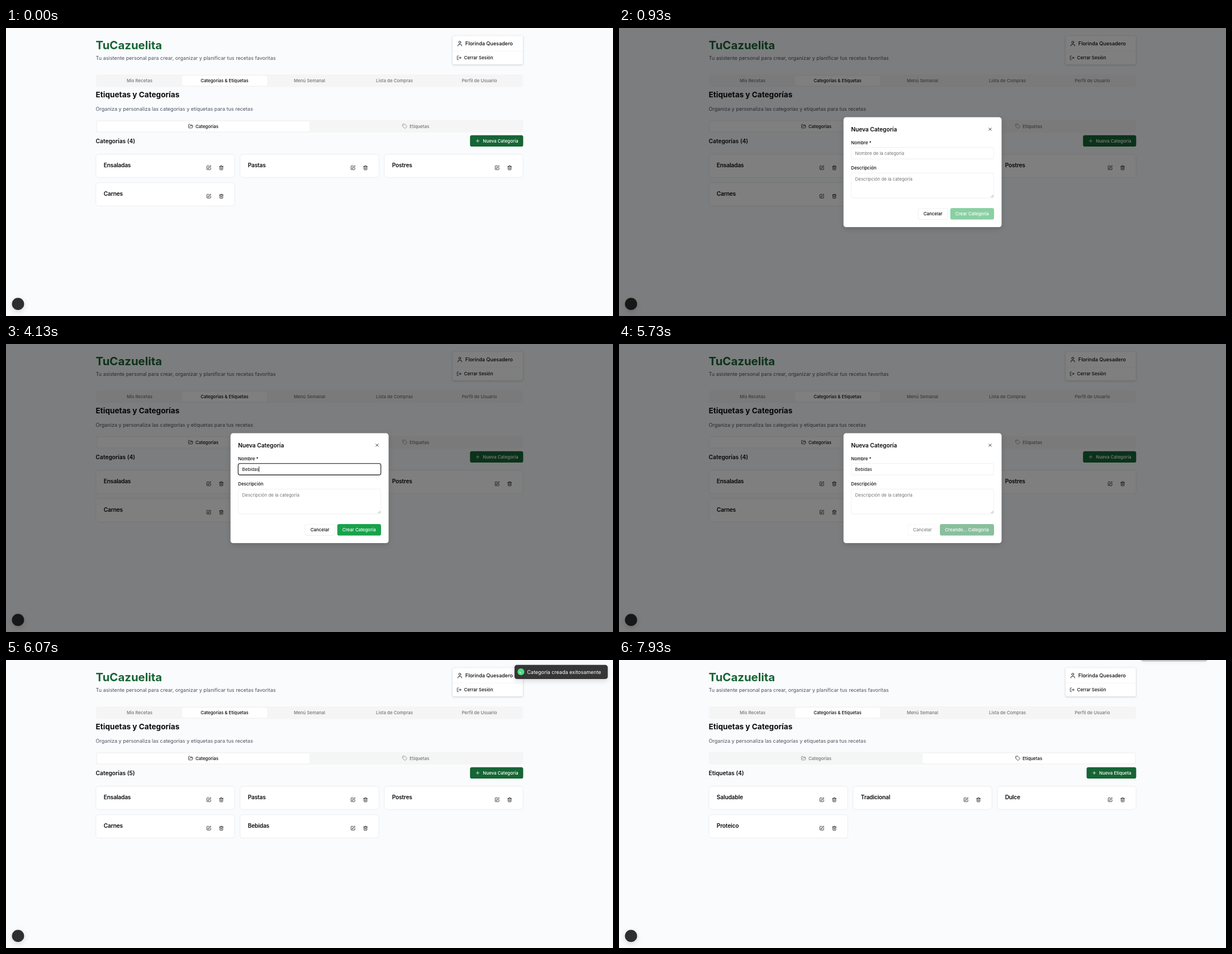
Animation of 1086 by 515 pixels, one loop 8000 ms. Source, as an HTML page:

```html
<!DOCTYPE html>
<html lang="es">
<head>
<meta charset="utf-8">
<title>Etiquetas y Categorías</title>
<style>
  html, body { margin: 0; width: 100%; height: 100%; overflow: hidden; background: #fafbfd; }
  svg { display: block; font-family: Inter, sans-serif; font-optical-sizing: none; }
  text { white-space: pre; }
  .sm { filter: drop-shadow(0 .6px .6px rgba(0, 0, 0, .08)); }
  .md { filter: drop-shadow(0 1.2px 1.5px rgba(0, 0, 0, .16)); }
  .lg { filter: drop-shadow(0 3px 5px rgba(0, 0, 0, .15)); }
</style>
</head>
<body>
<svg id="stage" width="1086" height="515" viewBox="0 0 1086 515"></svg>
<script>
const LOOP = 8000;
const HOVER = 270, OPEN = 930, FOCUS = 1600, SUBMIT_HOVER = 5200, SUBMIT = 5670, CLOSE = 5800, TOAST_OUT = 7800, SWITCH = 7870;
const NAME = 'Bebidas', KEYS = [2600, 3200, 3400, 3670, 3870, 4070, 4130];
const SM = 7.92, BASE = 9.05, LG = 10.18;           // type sizes
const INK = '#0a0a0a', MUTED = '#737373', LINE = '#e5e7eb', GREEN = '#166534';

const ICONS = {
  user: 'M19 21v-2a4 4 0 0 0-4-4H9a4 4 0 0 0-4 4v2M16 7a4 4 0 1 1-8 0a4 4 0 1 1 8 0',
  logout: 'M9 21H5a2 2 0 0 1-2-2V5a2 2 0 0 1 2-2h4M16 17l5-5-5-5M21 12H9',
  folder: 'm6 14 1.5-2.9A2 2 0 0 1 9.24 10H20a2 2 0 0 1 1.94 2.5l-1.54 6a2 2 0 0 1-1.95 1.5H4a2 2 0 0 1-2-2V5a2 2 0 0 1 2-2h3.9a2 2 0 0 1 1.69.9l.81 1.2a2 2 0 0 0 1.67.9H18a2 2 0 0 1 2 2v2',
  tag: 'M12.6 2.6A2 2 0 0 0 11.2 2H4a2 2 0 0 0-2 2v7.2a2 2 0 0 0 .6 1.4l8.7 8.7a2.4 2.4 0 0 0 3.4 0l6.6-6.6a2.4 2.4 0 0 0 0-3.4zM7.5 7.5h.01',
  edit: 'M12 3H5a2 2 0 0 0-2 2v14a2 2 0 0 0 2 2h14a2 2 0 0 0 2-2v-7M18.4 2.6a1 1 0 0 1 3 3l-9 9a2 2 0 0 1-.9.5l-2.9.9a.5.5 0 0 1-.6-.6l.9-2.9a2 2 0 0 1 .5-.9z',
  trash: 'M3 6h18M19 6v14c0 1-1 2-2 2H7c-1 0-2-1-2-2V6M8 6V4c0-1 1-2 2-2h4c1 0 2 1 2 2v2M10 11v6M14 11v6',
  plus: 'M5 12h14M12 5v14',
  close: 'M18 6 6 18M6 6l12 12'
};

const clamp = p => Math.max(0, Math.min(1, p));
const mix = (a, b, p) => `rgb(${a.map((v, i) => Math.round(v + (b[i] - v) * p))})`;

function bezier(x1, y1, x2, y2, x) {
  const at = (a, b, u) => 3 * a * u * (1 - u) ** 2 + 3 * b * u * u * (1 - u) + u ** 3;
  let lo = 0, hi = 1;
  for (let i = 0; i < 24; i++) {
    const mid = (lo + hi) / 2;
    if (at(x1, x2, mid) < x) lo = mid; else hi = mid;
  }
  return at(y1, y2, lo);
}

// Text is placed by the vertical centre of its capitals.
const text = (x, cy, str, size, weight = 400, fill = INK, extra = '') =>
  `<text x="${x}" y="${cy + size * .364}" font-size="${size}" font-weight="${weight}" fill="${fill}" ${extra}>${str}</text>`;
const centred = (x, cy, str, size, weight, fill) => text(x, cy, str, size, weight, fill, 'text-anchor="middle"');
const box = (x, y, w, h, r, fill, extra = '') =>
  `<rect x="${x}" y="${y}" width="${w}" height="${h}" rx="${r}" fill="${fill}" ${extra}/>`;
const border = (color = LINE, width = .6) => `stroke="${color}" stroke-width="${width}"`;
const icon = (name, cx, cy, color = INK, size = BASE) =>
  `<path d="${ICONS[name]}" transform="translate(${cx - size / 2} ${cy - size / 2}) scale(${size / 24})"
    fill="none" stroke="${color}" stroke-width="2" stroke-linecap="round" stroke-linejoin="round"/>`;

const ruler = document.createElement('canvas').getContext('2d');
function textWidth(str) {
  ruler.font = `400 ${SM * 10}px Inter, sans-serif`;
  return ruler.measureText(str).width / 10;
}

function header() {
  const tabs = ['Mis Recetas', 'Categorías &amp; Etiquetas', 'Menú Semanal', 'Lista de Compras', 'Perfil de Usuario'];
  return text(160.6, 30.6, 'TuCazuelita', 20.36, 700, GREEN) +
    text(160.6, 53.4, 'Tu asistente personal para crear, organizar y planificar tus recetas favoritas', BASE, 400, '#4b5563') +
    box(798.8, 13.8, 126.2, 51.4, 2.6, '#fff', `class="md" ${border()}`) +
    box(799, 41, 125.8, .6, 0, '#f0f1f3') +
    icon('user', 811.9, 27.9, INK, 11.3) + text(821.8, 28, 'Florinda Quesadero', BASE, 500) +
    icon('logout', 810.7, 53.3) + text(819.6, 53.3, 'Cerrar Sesión', SM, 500) +
    box(160.6, 83.1, 764.7, 22.4, 4.5, '#f5f5f5') +
    box(315.1, 85.2, 152, 18.3, 3.4, '#fff', 'class="sm"') +
    tabs.map((s, i) => centred(239 + 152 * i, 94.5, s, SM, 500, i === 1 ? INK : MUTED)).join('') +
    text(160.6, 119, 'Etiquetas y Categorías', 13.58, 700) +
    text(160.6, 144.3, 'Organiza y personaliza las categorías y etiquetas para tus recetas', BASE, 400, '#4b5563');
}

function card(name, i) {
  const x = 160.9 + 257.92 * (i % 3), y = 225.9 + 50.9 * Math.floor(i / 3);
  return box(x, y, 248.3, 41.3, 4.5, '#fff', `class="sm" ${border()}`) +
    text(x + 13.9, y + 19, name, LG, 600, INK, 'letter-spacing="-.18"') +
    icon('edit', x + 201.9, y + 24) + icon('trash', x + 224.3, y + 24);
}

function panel(t) {
  const tags = t >= SWITCH;
  const names = tags ? ['Saludable', 'Tradicional', 'Dulce', 'Proteico']
    : ['Ensaladas', 'Pastas', 'Postres', 'Carnes'].concat(t >= CLOSE ? NAME : []);
  const [folderInk, tagInk] = tags ? [MUTED, INK] : [INK, MUTED];
  const hover = t < OPEN ? clamp((t - HOVER + 40) / 150) : 0;
  const left = tags ? 836.6 : 830.2;
  return box(160.6, 164.5, 764.7, 22.4, 4.5, '#f5f5f5') +
    box(tags ? 543.2 : 162.7, 166.6, 380.3, 18.3, 3.4, '#fff', 'class="sm"') +
    icon('folder', 330.4, 175.7, folderInk) + text(339, 175.8, 'Categorías', SM, 500, folderInk) +
    icon('tag', 713.4, 175.7, tagInk) + text(722, 175.8, 'Etiquetas', SM, 500, tagInk) +
    text(160.6, 201.8, `${tags ? 'Etiquetas' : 'Categorías'} (${names.length})`, LG, 600) +
    box(left, 191.7, 925.3 - left, 20.4, 3.4, mix([22, 101, 52], [20, 83, 45], hover), 'class="sm"') +
    icon('plus', left + 13.7, 201.9, '#fff') +
    text(916.4, 201.9, tags ? 'Nueva Etiqueta' : 'Nueva Categoría', SM, 500, '#fff', 'text-anchor="end"') +
    names.map(card).join('');
}

function nameField(t) {
  const typed = NAME.slice(0, KEYS.filter(k => k <= t).length);
  const focused = t >= FOCUS && t < SUBMIT;
  const lastKey = [FOCUS, ...KEYS].filter(k => k <= t).pop();
  const caret = focused && (t - lastKey) % 1060 < 530;
  return box(415.3, 213.7, 255.4, 20.4, 3.4, '#fff', focused ? border(INK, 1.1) : `class="sm" ${border()}`) +
    text(422.6, 224, typed || 'Nombre de la categoría', SM, 400, typed ? INK : MUTED) +
    (caret ? box(422.4 + textWidth(typed), 219, .8, 10, 0, INK) : '');
}

function dialog(t) {
  const sending = t >= SUBMIT;
  const shift = sending ? 18.6 : 0;
  const opacity = sending ? .5 : .5 + .5 * clamp((t - KEYS[0] + 35) / 70);
  const fill = mix([22, 163, 74], [21, 128, 61], clamp((t - SUBMIT_HOVER + 20) / 150));
  return box(0, 0, 1086, 515, 0, '#000', 'opacity=".5"') +
    box(401.7, 159.6, 282.8, 196.5, 4.5, '#fff', 'class="lg"') +
    text(415.2, 181, 'Nueva Categoría', LG, 600) + icon('close', 663.9, 181) +
    text(415.2, 205.3, 'Nombre *', SM, 500) + nameField(t) +
    text(415.2, 250.6, 'Descripción', SM, 500) +
    box(415.3, 259.4, 255.4, 44.5, 3.4, '#fff', `class="sm" ${border()}`) +
    text(422.6, 269.8, 'Descripción de la categoría', SM, 400, MUTED) +
    `<path d="M665.4 302.8l4.4-4.4M668 302.8l1.8-1.8" ${border('#666')}/>` +
    `<g opacity="${sending ? .5 : 1}">` +
    box(535.1 - shift, 322.3, 53, 20.2, 3.4, '#fff', `class="sm" ${border()}`) +
    centred(561.6 - shift, 332.4, 'Cancelar', SM, 500) + '</g>' +
    `<g opacity="${opacity}">` +
    box(592.7 - shift, 322, 78.3 + shift, 20.6, 3.4, fill) +
    centred(631.8 - shift / 2, 332.4, sending ? 'Creando... Categoría' : 'Crear Categoría', SM, 500, '#fff') + '</g>';
}

function toast(t) {
  const age = t - CLOSE;
  let hidden, rise, opacity;
  if (t < TOAST_OUT) {
    hidden = 1 - bezier(.21, 1.02, .73, 1, clamp(age / 350));
    rise = 2 * hidden;
    opacity = 1 - .5 * hidden;
  } else {
    hidden = bezier(.06, .71, .55, 1, clamp((t - TOAST_OUT) / 400));
    rise = 1.5 * hidden;
    opacity = 1 - hidden;
  }
  const pop = bezier(.175, .885, .32, 1.275, clamp((age - 100) / 300));
  const check = 8 * (1 - clamp((age - 200) / 200));
  return `<g class="lg" opacity="${opacity}" transform="translate(993.2 ${22 - 25.4 * rise}) scale(${1 - .4 * hidden})">` +
    box(-83.8, -12.7, 167.6, 25.4, 4.5, '#363636') +
    `<g transform="translate(-72.2 -.3) scale(${pop})"><circle r="5.66" fill="#4ade80"/>
      <path d="M-2.3 .2L-.6 1.9L2.5 -1.8" fill="none" stroke="#fff" stroke-width="1.1" stroke-dasharray="8" stroke-dashoffset="${check}"/></g>` +
    text(-61.2, 0, 'Categoría creada exitosamente', BASE, 400, '#fff') + '</g>';
}

const stage = document.getElementById('stage');
let shown = '';

function frame(now) {
  const t = now % LOOP;
  const markup = header() + panel(t) +
    '<circle class="lg" cx="21.5" cy="493.4" r="10.9" fill="#2e2e2e"/>' +
    (t >= OPEN && t < CLOSE ? dialog(t) : '') +
    (t >= CLOSE ? toast(t) : '');
  if (markup !== shown) stage.innerHTML = shown = markup;
  requestAnimationFrame(frame);
}
frame(performance.now());
</script>
</body>
</html>
```
